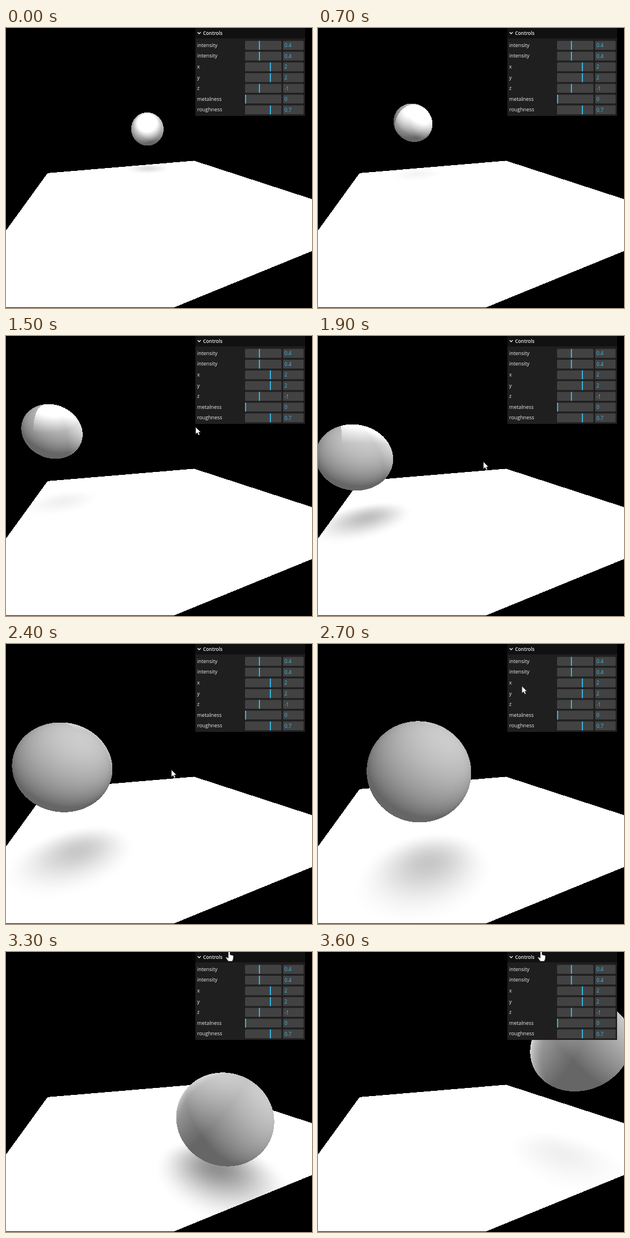
An HTML page with a canvas for the animation above (3700 ms loop, 530x484 px).

```html
<!DOCTYPE html>
<html lang="en">
<head>
<meta charset="utf-8">
<title>Bouncing sphere</title>
<style>
  html, body { margin: 0; width: 530px; height: 484px; overflow: hidden; background: #000; }
  canvas, svg { position: absolute; left: 0; top: 0; display: block; }
  text { font: 8.9px "Open Sans", "Noto Sans", sans-serif; fill: #ebebeb; }
  .title { font-size: 8.3px; font-weight: 600; }
  .value { font-size: 8.6px; fill: #3fbdea; }
</style>
</head>
<body>
<canvas id="scene" width="530" height="484"></canvas>
<svg width="530" height="484" viewBox="0 0 530 484">
  <g id="panel">
    <rect x="328" width="190" height="152" fill="#1f1f1f"/>
    <rect x="328" width="190" height="18" fill="#111"/>
    <path d="M331.8 7.2l2.7 2.8 2.7-2.8" fill="none" stroke="#ebebeb" stroke-width="1.3"/>
    <text class="title" x="341.3" y="11.5">Controls</text>
  </g>
  <path id="arrow" d="M0 0V12.2L2.9 9.6 4.9 14 7 13.1 5.1 8.8H8.8Z" fill="#fff" stroke="#222" stroke-width=".6"/>
  <path id="hand" d="M-1.5 11V-1.5Q0-3.5 1.5-1.5V4.8L6 5.8Q7.7 6.3 7.6 8L6.8 12.8 5.4 16H-1.5L-5.4 10.4Q-5.6 8.4-3.6 9Z" fill="#fff" stroke="#222" stroke-width=".6"/>
</svg>
<script>
const W = 530, H = 484, LOOP = 3700, STEP = 100;
const FOCAL = 316.6, CX = 265, CY = 240.5;
const SIN = 0.2267, COS = 0.974, DIST = 3.887;
const RADIUS = 0.498, ORBIT = 2, FLOOR_Y = -0.5, SHADOW_R = 0.76;
const EYE = [0, DIST * SIN, DIST * COS];

const $ = id => document.getElementById(id);
const ctx = $('scene').getContext('2d');
const image = ctx.createImageData(W, H);
const pixels = new Uint32Array(image.data.buffer);
const dot = (a, b) => a[0] * b[0] + a[1] * b[1] + a[2] * b[2];
const sub = (a, b) => [a[0] - b[0], a[1] - b[1], a[2] - b[2]];
const length = a => Math.sqrt(dot(a, a));
const unit = a => a.map(v => v / length(a));

// The floor's axes are turned against the view.
const turn = (x, y, z) => [0.376 * x - 0.927 * z, y, 0.927 * x + 0.376 * z];
const AMBIENT = 0.4;
const SUN = { power: 0.4, dir: unit(turn(2, 2, -1)) };
const SPOT = { power: 0.4, pos: turn(0, 2, 2), range: 10, cone: Math.cos(Math.PI * 0.3) };
SPOT.axis = unit(SPOT.pos);
const BULB = { power: 0.3, pos: turn(-1, 1, 0) };

function buildPanel() {
  const rows = [['intensity', 0.4, 438], ['intensity', 0.4, 438], ['x', 2, 457], ['y', 2, 457],
    ['z', -1, 438], ['metalness', 0, 414], ['roughness', 0.7, 457]];
  $('panel').innerHTML += rows.map(([name, value, mark], i) => {
    const y = 30 + i * 18.58;
    return `<text x="331" y="${y + 2.8}">${name}</text>
      <rect x="414" y="${y - 7.7}" width="63" height="15.4" rx="1.5" fill="#424242"/>
      <rect x="480" y="${y - 7.7}" width="35.5" height="15.4" rx="1.5" fill="#424242"/>
      <rect x="${mark}" y="${y - 7.7}" width="1.8" height="15.4" fill="#35bdee"/>
      <text class="value" x="482.3" y="${y + 3.3}">${value}</text>`;
  }).join('');
}

function sphereShade(point, ball) {
  const normal = sub(point, ball).map(v => v / RADIUS);
  const facing = dir => Math.max(0, dot(normal, dir));
  let light = AMBIENT + SUN.power * facing(SUN.dir) + BULB.power * facing(unit(sub(BULB.pos, point)));
  const toSpot = sub(SPOT.pos, point), dir = unit(toSpot);
  if (dot(dir, SPOT.axis) > SPOT.cone) {
    light += SPOT.power * (1 - length(toSpot) / SPOT.range) * facing(dir);
  }
  return Math.min(1, light);
}

function floorShade(x, z, ball) {
  if (Math.abs(x * 0.927 - z * 0.376) > 2.5 || Math.abs(x * 0.376 + z * 0.927) > 2.5) return 0;
  const near = Math.max(0, 1 - Math.hypot(x - ball[0], z - ball[2]) / SHADOW_R);
  return 1 - 0.5 * (1 - ball[1]) * near * near * (3 - 2 * near);
}

function drawScene(seconds) {
  const angle = 0.183 + seconds;
  const ball = [-ORBIT * Math.sin(angle), Math.abs(Math.sin(4 * seconds + 2.33)), -ORBIT * Math.cos(angle)];
  const offset = sub(EYE, ball);
  const offsetTerm = dot(offset, offset) - RADIUS * RADIUS;
  for (let py = 0; py < H - 1; py++) {
    const up = (CY - py - 0.5) / FOCAL;
    const dy = -SIN + up * COS, dz = -COS - up * SIN;
    for (let px = 0; px < W; px++) {
      const dx = (px + 0.5 - CX) / FOCAL;
      const a = dx * dx + dy * dy + dz * dz;
      const b = dx * offset[0] + dy * offset[1] + dz * offset[2];
      const disc = b * b - a * offsetTerm;
      let shade = 0;
      if (disc > 0) {
        const t = (-b - Math.sqrt(disc)) / a;
        shade = sphereShade([dx * t, EYE[1] + dy * t, EYE[2] + dz * t], ball);
      } else if (dy < 0) {
        const t = (FLOOR_Y - EYE[1]) / dy;
        shade = floorShade(dx * t, EYE[2] + dz * t, ball);
      }
      pixels[py * W + px] = 0xff000000 | Math.round(shade * 255) * 0x010101;
    }
  }
  ctx.putImageData(image, 0, 0);
}

function place(id, visible, x, y) {
  $(id).setAttribute('visibility', visible ? 'visible' : 'hidden');
  $(id).setAttribute('transform', `translate(${x} ${y})`);
}

function drawCursor(ms) {
  const ramp = (from, to) => Math.min(1, Math.max(0, (ms - from) / (to - from)));
  const enter = ramp(1500, 1800), leave = ramp(2500, 2800);
  place('arrow', ms >= 1500 && ms < 2800, 328.5 - 42 * enter + 100 * leave, 157.5 + 60 * enter - 217 * leave);
  place('hand', ms >= 2800, 386.5, 0);
}

let shown = -1;
function frame(now) {
  const ms = Math.floor((now % LOOP) / STEP) * STEP;
  if (ms !== shown) {
    shown = ms;
    drawScene(ms / 1000 * 1.0045 - 0.004);
    drawCursor(ms);
  }
  requestAnimationFrame(() => frame(performance.now() - start));
}

buildPanel();
const start = performance.now();
frame(0);
</script>
</body>
</html>
```
